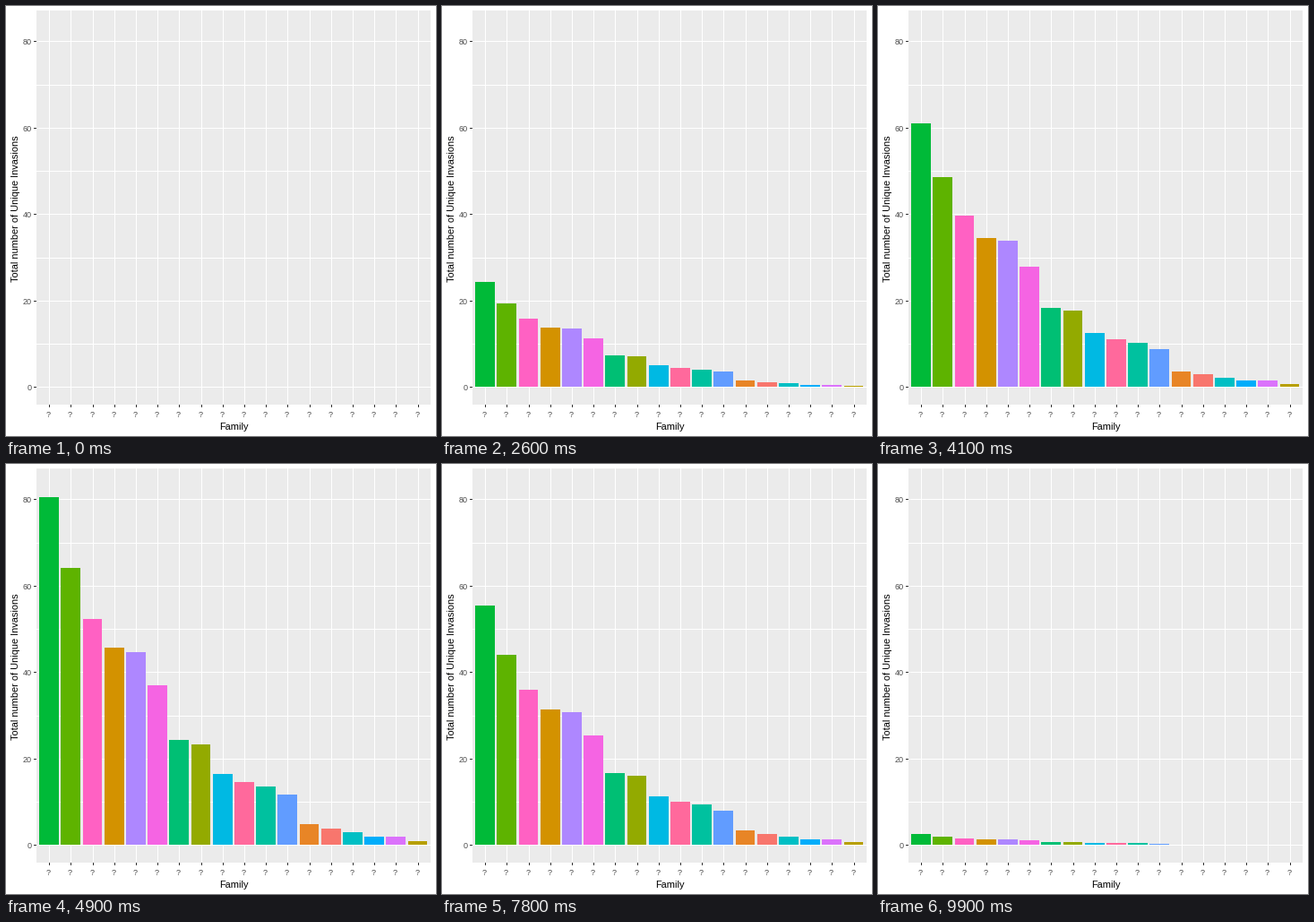
Recreate the animation shown at these times as a matplotlib script. Size 480x480 px, loop 10000 ms.

```python
import matplotlib.pyplot as plt
from matplotlib.animation import FuncAnimation
from matplotlib.patches import Rectangle

SIZE, DPI = 480, 72
FRAMES, INTERVAL = 100, 100
LEFT, TOP, RIGHT, BOTTOM = 34, 5, 474, 445
BASE, UNIT = 425.4, 4.825          # zero line and pixels per invasion
FIRST_X, STEP_X = 48.15, 24.2      # first category and spacing
HALF_BAR = 0.45 * STEP_X

BARS = [
    (83, "#00BA38"), (66, "#5EB300"), (54, "#FF61C3"), (47, "#D39200"),
    (46, "#AE87FF"), (38, "#F564E3"), (25, "#00BF74"), (24, "#93AA00"),
    (17, "#00B9E3"), (15, "#FF699C"), (14, "#00C19F"), (12, "#619CFF"),
    (5, "#E88526"), (4, "#F8766D"), (3, "#00BFC4"), (2, "#00ADFA"),
    (2, "#DB72FB"), (1, "#B79F00"),
]

plt.rcParams["font.family"] = "Liberation Sans"
plt.rcParams["toolbar"] = "None"

fig = plt.figure(figsize=(SIZE / DPI, SIZE / DPI), dpi=DPI, facecolor="white")
ax = fig.add_axes([0, 0, 1, 1])
ax.set_xlim(0, SIZE)
ax.set_ylim(SIZE, 0)
ax.axis("off")


def box(x0, y0, x1, y1, color):
    """Fill a pixel-aligned rectangle."""
    return ax.add_patch(Rectangle((x0, y0), x1 - x0, y1 - y0,
                                  facecolor=color, linewidth=0))


def label(x, y, text, size, color, **kwargs):
    options = dict(ha="center", va="baseline")
    options.update(kwargs)
    ax.text(x, y, text, fontsize=size, color=color, **options)


def value_y(value):
    return round(BASE - value * UNIT)


def category_x(index):
    return FIRST_X + index * STEP_X


def draw_axes():
    box(LEFT, TOP, RIGHT, BOTTOM, "#EBEBEB")
    for value in range(0, 90, 10):
        y = value_y(value)
        box(LEFT, y, RIGHT, y + 1, "white")
        if value % 20 == 0:
            box(LEFT - 3, y, LEFT, y + 1, "#333333")
            label(29, y + 4, str(value), 9, "#4D4D4D", ha="right")
    for index in range(len(BARS)):
        x = round(category_x(index))
        box(x, TOP, x + 1, BOTTOM, "white")
        box(x, BOTTOM, x + 1, BOTTOM + 3, "#333333")
        label(x - 0.5, 459, "?", 9, "#4D4D4D")
    label(254, 473, "Family", 11, "black")
    label(16, 226, "Total number of Unique Invasions", 11, "black",
          rotation=90, ha="right", va="center")


def level(frame):
    """Share of full height: wait, linear rise, hold, linear fall."""
    rise = (frame - 16) / 34
    fall = (FRAMES - frame) / 33
    return max(0, min(1, rise, fall))


draw_axes()
bars = []
for i, (_, fill) in enumerate(BARS):
    center = category_x(i)
    bars.append(box(round(center - HALF_BAR), value_y(0),
                    round(center + HALF_BAR), value_y(0), fill))


def update(frame):
    share = level(frame)
    for bar, (total, _) in zip(bars, BARS):
        top = value_y(total * share)
        bar.set_y(top)
        bar.set_height(value_y(0) - top)
        bar.set_visible(top < value_y(0))
    return bars


animation = FuncAnimation(fig, update, frames=FRAMES, interval=INTERVAL,
                          repeat=True, repeat_delay=0, blit=False)
plt.show()
```
